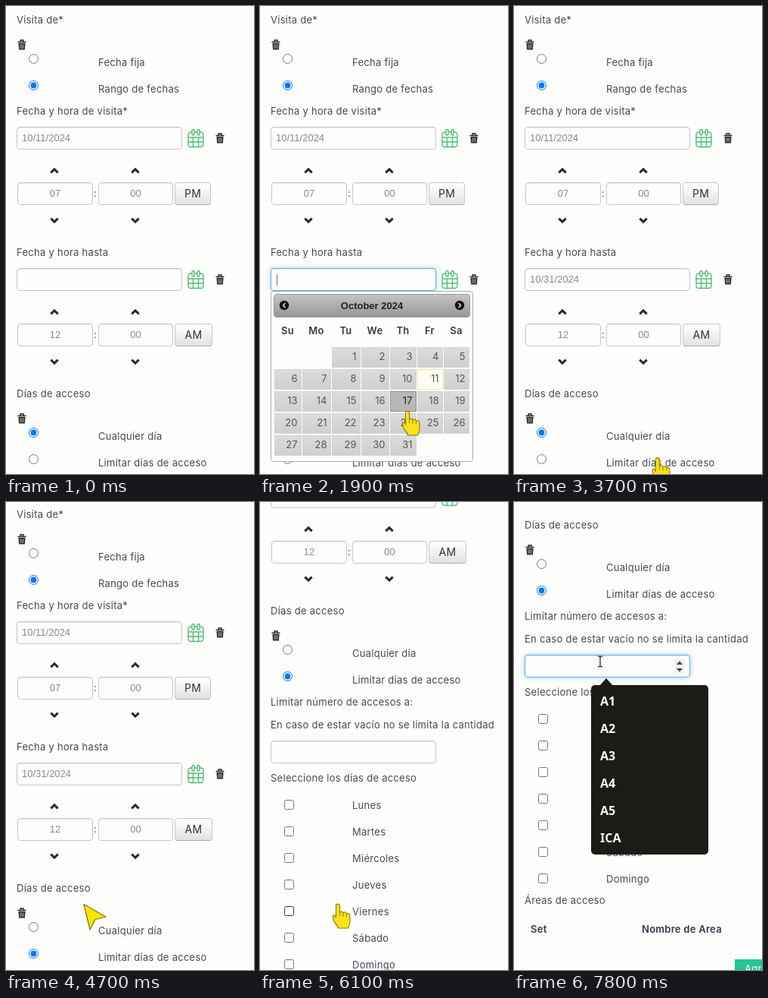
Recreate the animation shown at these times as an HTML page. Size 328x616 px, loop 8 s.

```html
<!DOCTYPE html>
<html lang="es">
<head>
<meta charset="utf-8">
<title>Formulario de visita</title>
<style>
  html, body { margin: 0; width: 100%; height: 100%; overflow: hidden; background: #fefefc; }
  #stage { position: relative; width: 328px; height: 616px; overflow: hidden; }
  #page { position: absolute; inset: 0; will-change: transform; }
  #stage div, #stage svg, #stage input { position: absolute; box-sizing: border-box; margin: 0; pointer-events: none; }
  #stage svg { overflow: visible; }
  .text { font: 13px/20px Inter, sans-serif; letter-spacing: .27px; color: #3f4a55; white-space: nowrap; }
  .bold { font-weight: 600; color: #2f3b48; }
  .mid { transform: translateX(-50%); }
  .field { height: 30px; border: 1px solid #c6c6c6; border-radius: 4px; background: #fefefc;
    box-shadow: inset 0 1px 1px rgba(0,0,0,.08); font: 13px/28px "Liberation Sans", Arial, sans-serif; color: #888; padding-left: 6px; }
  .time { text-align: center; padding: 0; }
  .focus { border-color: #66afe9; box-shadow: inset 0 1px 1px rgba(0,0,0,.08), 0 0 7px rgba(102,175,233,.6); }
  .button { height: 30px; border: 1px solid #c8c8c8; border-bottom-color: #aaa; border-radius: 4px;
    background: linear-gradient(#fff, #e2e2e2); font: 14px/27px Inter, sans-serif; letter-spacing: .3px; color: #333; text-align: center; }
  .check { width: 13px; height: 13px; border: 1px solid #767676; border-radius: 2.5px; background: #fff; }
  .caret { width: 1px; height: 15px; background: #777; }
  #calendar { left: 14px; top: 375px; width: 268px; height: 225px; border: 1px solid #aaa; border-radius: 4px; background: #fefefc; }
  #calendar .head { left: 3px; top: 3px; width: 260px; height: 31px; border: 1px solid #999; border-radius: 4px;
    background: linear-gradient(#c4c4c4, #979797); font: bold 13px/29px "Liberation Sans", Arial, sans-serif; color: #222; text-align: center; }
  .day { height: 27px; border: 1px solid #d3d3d3; background: linear-gradient(#dcdcdc, #cfcfcf);
    font: 13px/22px Inter, sans-serif; color: #555; text-align: right; padding-right: 4px; }
  .today { background: #fffef2; border-color: #f3e9a0; }
  .over { background: #b8b8b8; border-color: #8e8e8e; color: #222; }
  #menu { left: 102px; top: 721px; width: 155px; height: 223px; border-radius: 5px; background: #1b1b18; }
  #menu div { left: 12px; font: 600 16px/24px "Noto Sans", sans-serif; color: #fff; }
</style>
</head>
<body>
<div id="stage"><div id="page"></div></div>
<script>
const $ = id => document.getElementById(id);
const box = (cls, x, y, w, body = '', id = '') =>
  `<div class="${cls}" id="${id}" style="left:${x}px;top:${y}px;${w ? `width:${w}px` : ''}">${body}</div>`;
const text = (x, y, body, cls = '') => box('text ' + cls, x, y - 10, 0, body);
const icon = (x, y, body, id = '') =>
  `<svg id="${id}" width="1" height="1" style="left:${x}px;top:${y}px" fill="none">${body}</svg>`;
const radio = (y, on, id = '') =>
  `<input type="radio" id="${id}" ${on ? 'checked' : ''} style="left:30px;top:${y - 6}px;width:13px;height:13px">`;

const trash = (x, y) => icon(x, y, `<path d="M-5.5-3.5h11M-2-4v-2h4v2" stroke="#222" stroke-width="1.4"/>
  <path d="M-4.5-2h9l-.6 8.5h-7.8z" fill="#222"/><path d="M-2-.8v6M0-.8v6M2-.8v6" stroke="#ddd" stroke-width=".8"/>`);
const chevron = (x, y, dir) =>
  icon(x, y, `<path d="M-4.7 ${2.3 * dir}L0 ${-2.2 * dir}L4.7 ${2.3 * dir}" stroke="#2a2a2a" stroke-width="3"/>`);
const calendarIcon = y => icon(240, y, `<g stroke="#4dbd74" stroke-width="1.4">
  <rect x="1" y="4" width="20" height="19.500" rx="3.5"/><path d="M1 11h20M1 17h20M7.500 11v12.500M14.500 11v12.500"/>
  <g fill="#fefefc"><rect x="6" y=".5" width="3" height="7.5" rx="1.5"/>
  <rect x="13" y=".5" width="3" height="7.5" rx="1.5"/></g></g>`);

function dateBlock(y, label, date, hour, half, halfWidth, id) {
  const arrows = [64, 171].map(x => chevron(x, y + 79, 1) + chevron(x, y + 144, -1)).join('');
  return text(14, y, label) + box('field', 14, y + 21, 219, date, id) + calendarIcon(y + 24) + trash(283, y + 36)
    + arrows + box('field time', 15, y + 94, 100, hour) + text(116, y + 108, ':')
    + box('field time', 122, y + 94, 99, '00') + box('button', 223, y + 94, halfWidth, half);
}

const columns = [19, 56, 95, 134, 172, 208, 243, 278];
const days = Array.from({ length: 31 }, (_, i) => {
  const col = (i + 2) % 7, row = Math.floor((i + 2) / 7);
  return { x: columns[col], y: 449 + 29 * row, w: columns[col + 1] - columns[col] - 1.5 };
});
const navDot = (x, dir) => icon(x, 18, `<circle r="6.2" fill="#111"/>
  <path d="M${-1.5 * dir}-3L${1.5 * dir} 0L${-1.5 * dir} 3" stroke="#ddd" stroke-width="1.5"/>`);
const calendar = `<div id="calendar">${box('head', 3, 3, 260, 'October 2024')}${navDot(17, -1)}${navDot(249, 1)}
  ${['Su', 'Mo', 'Tu', 'We', 'Th', 'Fr', 'Sa'].map((d, i) =>
    text((columns[i] + columns[i + 1]) / 2 - 16, 51, d, 'bold mid')).join('')}
  ${days.map((d, i) => box('day' + (i === 10 ? ' today' : ''), d.x - 15, d.y - 376, d.w, i + 1, 'day' + i)).join('')}</div>`;

const weekdays = ['Lunes', 'Martes', 'Miércoles', 'Jueves', 'Viernes', 'Sábado', 'Domingo'];
const menu = `<div id="menu">${icon(20, 0, '<path d="M-9 1L0-9L9 1z" fill="#1b1b18"/>')}
  ${['A1', 'A2', 'A3', 'A4', 'A5', 'ICA'].map((s, i) => box('', 12, 9 + 36 * i, 0, s)).join('')}</div>`;

$('page').innerHTML = text(14, 18, 'Visita de*') + trash(21, 51)
  + radio(69, false) + text(122, 74, 'Fecha fija') + radio(104, true) + text(122, 109, 'Rango de fechas')
  + dateBlock(138, 'Fecha y hora de visita*', '10/11/2024', '07', 'PM', 48, 'from')
  + dateBlock(324, 'Fecha y hora hasta', '', '12', 'AM', 50, 'until') + box('caret', 22, 353, 1, '', 'untilCaret')
  + text(14, 510, 'Días de acceso') + trash(21, 543)
  + radio(561, true, 'anyDay') + text(122, 566, 'Cualquier día')
  + radio(596, false, 'limitDays') + text(122, 601, 'Limitar días de acceso')
  + text(14, 630, 'Limitar número de accesos a:')
  + text(14, 660, 'En caso de estar vacío no se limita la cantidad')
  + box('field', 14, 681, 219, '', 'limit') + box('caret', 21, 689, 1, '', 'limitCaret')
  + icon(219, 696, '<path d="M-6-9h13v18h-13z" fill="#eee"/><path d="M-4-2L0-6.500L4-2zM-4 3L0 7.500L4 3z" fill="#444"/>', 'spinner')
  + text(14, 730, 'Seleccione los días de acceso')
  + weekdays.map((d, i) => box('check', 32, 759 + 35 * i, 13, '', 'check' + i) + text(122, 766 + 35 * i, d)).join('')
  + text(14, 1004, 'Áreas de acceso') + text(22, 1042, 'Set', 'bold') + text(169, 1042, 'Nombre de Area', 'bold')
  + `<div style="left:292px;top:1082px;width:80px;height:26px;background:#22c793"></div>`
  + `<div class="text" style="left:305px;top:1084px;color:#fff">Agregar</div>`
  + calendar + menu;

const pointers = {
  arrow: `<path d="M0 .5L29 17L15 20.500L8 34z" fill="#f6e500" stroke="#7d7510" stroke-width="1.2" stroke-linejoin="round"/>`,
  hand: `<path d="M-2.500 18V2.500Q-2.500 0 0 0T2.500 2.500V11Q4.500 9 7 11.500Q9.500 10 11.500 12.500Q15.500 12 16 16V24Q15.500 28 13.500 32H.5
    Q-.5 28-4.500 24L-7 17Q-6.500 13-3.500 16z" fill="#f8e21c" stroke="#8c7c08" stroke-width="1.1" stroke-linejoin="round"/>
    <path d="M2.500 11v5M7 12v5M11.500 13v4" stroke="#8c7c08"/>`,
  beam: `<path d="M-3-7Q0-7 0-5Q0-7 3-7M0-5V5M-3 7Q0 7 0 5Q0 7 3 7" stroke="#333" stroke-width="1.3"/>`
};
$('stage').insertAdjacentHTML('beforeend',
  Object.entries(pointers).map(([name, shape]) => icon(0, 0, shape, name)).join(''));

// [time, x, y]
const path = [[400, 340, 470], [1200, 250, 362], [1500, 250, 362], [1880, 195, 533], [2000, 195, 533],
  [2250, 189, 574], [3300, 189, 574], [3800, 190, 597], [4000, 190, 597], [4400, 103, 529], [6500, 103, 529], [7050, 114, 210]];
const looks = [[400, 'arrow'], [1120, 'hand'], [4330, 'arrow'], [5600, 'hand'], [6350, 'arrow'], [6580, 'hand'], [6920, 'beam']];

const ramp = (t, a, b) => {
  const u = Math.min(1, Math.max(0, (t - a) / (b - a)));
  return u * u * (3 - 2 * u);
};
const show = (id, on) => $(id).style.visibility = on ? 'visible' : 'hidden';
const during = (t, a, b) => t >= a && t < b;

function pointerAt(t) {
  let [, x, y] = path[0];
  for (let i = 1; i < path.length; i++) {
    const u = ramp(t, path[i - 1][0], path[i][0]);
    x += (path[i][1] - path[i - 1][1]) * u;
    y += (path[i][2] - path[i - 1][2]) * u;
  }
  return [x, y];
}

function draw(t) {
  const scroll = 240 * ramp(t, 4678, 5078) + 120 * ramp(t, 5200, 5600) + 120 * ramp(t, 6049, 6400);
  $('page').style.transform = `translateY(${-Math.round(scroll)}px)`;

  const [x, y] = pointerAt(t);
  const look = looks.filter(l => t >= l[0]).pop();
  for (const name in pointers) {
    show(name, look && look[1] === name);
    $(name).style.transform = `translate(${x}px,${y}px)`;
  }

  const opacity = ramp(t, 1480, 1680) - ramp(t, 2400, 2600);
  $('calendar').style.opacity = opacity;
  days.forEach((d, i) => $('day' + i).classList.toggle('over',
    opacity > 0 && x >= d.x && x < d.x + d.w && y >= d.y && y < d.y + 27));

  $('until').classList.toggle('focus', during(t, 1480, 2400));
  $('until').textContent = t >= 2400 ? '10/31/2024' : '';
  show('untilCaret', during(t, 1480, 1980));

  $('anyDay').checked = t < 4000;
  $('limitDays').checked = t >= 4000;
  $('check4').style.borderColor = during(t, 5600, 6350) ? '#333' : '';

  $('limit').classList.toggle('focus', t >= 7200);
  show('limitCaret', during(t, 7200, 7700));
  show('spinner', t >= 6950);
  show('menu', t >= 7300);
}

function frame() {
  draw(performance.now() % 8000);
  requestAnimationFrame(frame);
}
frame();
</script>
</body>
</html>
```
